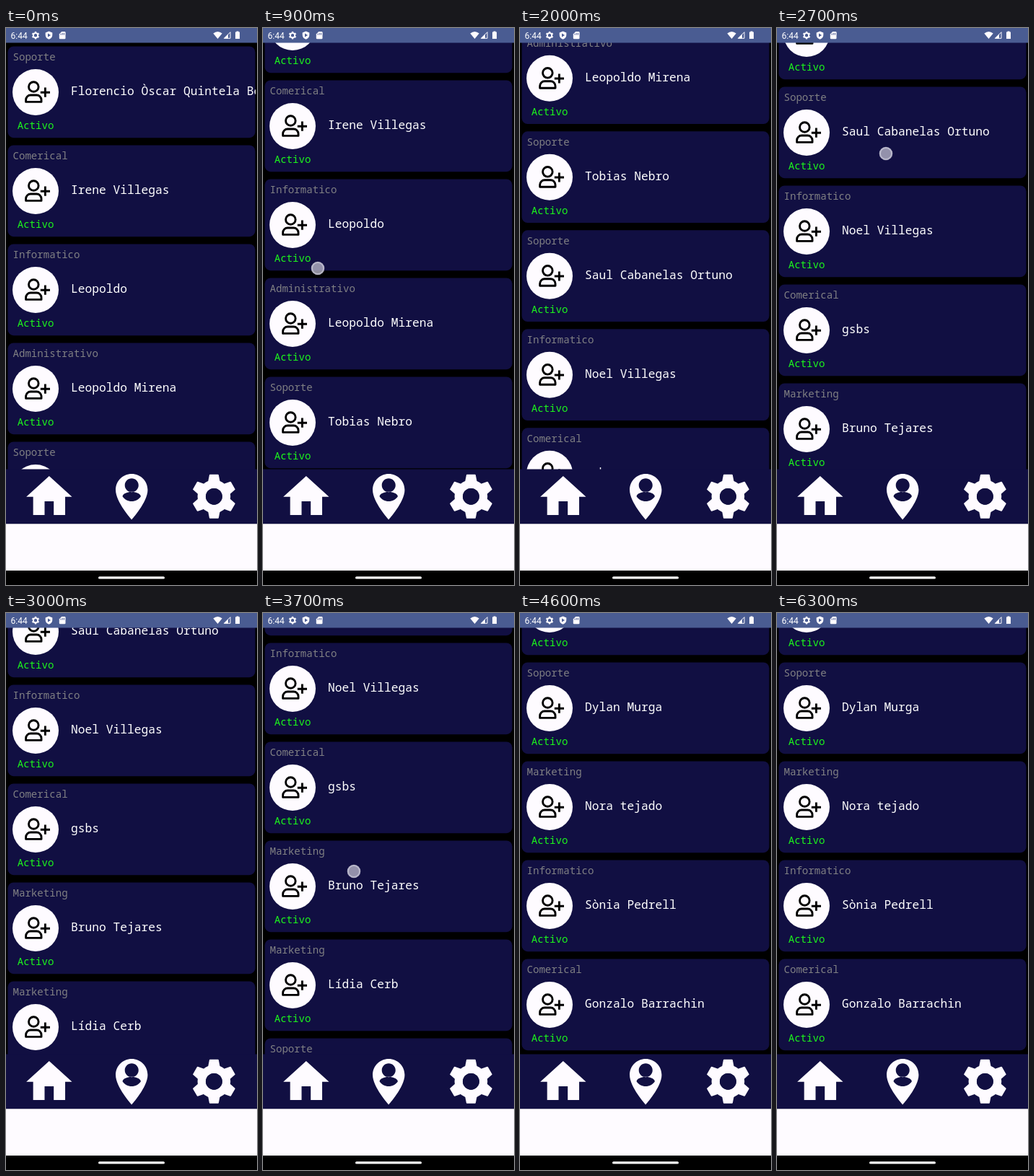
These frames come from a looping animation (348x772 px, 8100 ms). An HTML page:

```html
<!DOCTYPE html>
<html lang="es">
<head>
<meta charset="utf-8">
<title>Lista de contactos</title>
<style>
  html, body { margin: 0; width: 100%; height: 100%; overflow: hidden; background: #000; }
  svg { display: block; width: 348px; height: 772px; }
  .card text { font-family: "Noto Sans Mono", "DejaVu Sans Mono", monospace; font-weight: 300; white-space: pre; }
  .role { font-size: 14.1px; fill: #808083; }
  .name { font-size: 16.25px; fill: #fff; }
  .state { font-size: 14.1px; fill: #1cf51c; }
  .clock { font: 12px Roboto, sans-serif; fill: #fff; }
</style>
</head>
<body>
<svg viewBox="0 0 348 772">
  <defs>
    <clipPath id="viewport"><path d="M0 20H346V612H0z"/></clipPath>
    <path id="tooth" d="M-1.75-9.3H1.75L2.3-6.5 3-4H-3L-2.3-6.5z" stroke="#fefbff" stroke-width=".6" stroke-linejoin="round"/>
    <g id="gear">
      <g id="teeth"></g>
      <circle r="5.4" fill="none" stroke="#fefbff" stroke-width="3.6"/>
    </g>
    <mask id="hub">
      <path d="M-12-12H12V12H-12z" fill="#fff"/>
      <circle r="3.6" fill="#000"/>
    </mask>
    <g id="avatar">
      <circle cx="41" cy="89" r="32" fill="#fefbff"/>
      <g fill="none" stroke="#000" stroke-width="2.9" stroke-linejoin="round">
        <circle cx="38.3" cy="81.5" r="6.8"/>
        <path d="M27.6 102.4V99.5a6.5 6.5 0 0 1 6.5-6.5h8.4a6.5 6.5 0 0 1 6.5 6.5v2.9z"/>
        <path d="M47.8 89.2H61M54.4 82.6V95.8"/>
      </g>
    </g>
  </defs>

  <path d="M0 0H348V772H0z"/>
  <g clip-path="url(#viewport)"><g id="list"></g></g>
  <g id="touch">
    <circle r="9.3" fill="#b4b2c6" fill-opacity=".8"/>
    <circle r="8" fill="none" stroke="#d9d8e6" stroke-width="2" stroke-opacity=".55"/>
  </g>

  <path d="M0 0H348V20.4H0z" fill="#4a5c92"/>
  <text class="clock" x="6.5" y="14.5">6:44</text>
  <g fill="#fefbff">
    <use href="#gear" mask="url(#hub)" transform="translate(41 10.2) scale(.55)"/>
    <path d="M59.5 4.5L64.3 6.6V9.8C64.3 12.6 62.3 15 59.5 15.8 56.7 15 54.7 12.6 54.7 9.8V6.6z"/>
    <path d="M58 7.6L62 10.1 58 12.6z" fill="#4a5c92"/>
    <path d="M77.2 5H81.2Q82.5 5 82.5 6.2V14Q82.5 15.2 81.2 15.2H75Q73.8 15.2 73.8 14V8.4z"/>
    <path d="M76 7.8V9.6M78.2 6.8V9.6M80.4 6.8V9.6" stroke="#4a5c92"/>
    <path d="M287.3 7.6Q293.5 2.4 299.7 7.6L293.5 15z"/>
    <path d="M302.4 14.3L311 5.7V14.3z" fill="none" stroke="#fefbff"/>
    <path d="M302 14.6L308 8.6V14.6z"/>
    <path d="M319.5 4.5H322.5V5.6H324V15H318V5.6H319.5z"/>
  </g>

  <path d="M0 611.5H348V687.5H0z" fill="#110f42"/>
  <path d="M0 687.3H348V752H0z" fill="#fefbff"/>
  <path d="M0 752H348V772H0z"/>
  <rect x="128" y="760.2" width="92" height="3.4" rx="1.7" fill="#fff"/>
  <g fill="#fefbff">
    <path transform="translate(21.8 611.6) scale(3.17)" d="M10 20v-6h4v6h5v-8h3L12 3 2 12h3v8z"/>
    <path transform="translate(136.2 611.6) scale(3.17)" fill-rule="evenodd" d="M12 2C8.14 2 5 5.14 5 9c0 5.25 7 13 7 13s7-7.75 7-13c0-3.86-3.14-7-7-7zm0 2c1.66 0 3 1.34 3 3s-1.34 3-3 3-3-1.34-3-3 1.34-3 3-3zm0 10c-1.67 0-3.14-.85-4-2.15.02-1.32 2.67-2.05 4-2.05s3.98.73 4 2.05c-.86 1.3-2.33 2.15-4 2.15z"/>
    <use href="#gear" transform="translate(288.4 649.3) scale(3.17)"/>
  </g>
</svg>
<script>
const LOOP = 8100, STEP = 100, PITCH = 137;
const $ = id => document.getElementById(id);

const contacts = [
  ["Soporte", "Florencio Òscar Quintela Be"],
  ["Comerical", "Irene Villegas"],
  ["Informatico", "Leopoldo"],
  ["Administrativo", "Leopoldo Mirena"],
  ["Soporte", "Tobias Nebro"],
  ["Soporte", "Saul Cabanelas Ortuno"],
  ["Informatico", "Noel Villegas"],
  ["Comerical", "gsbs"],
  ["Marketing", "Bruno Tejares"],
  ["Marketing", "Lídia Cerb"],
  ["Soporte", "Dylan Murga"],
  ["Marketing", "Nora tejado"],
  ["Informatico", "Sònia Pedrell"],
  ["Comerical", "Gonzalo Barrachin"]
];

$("list").innerHTML = contacts.map(([role, name], i) => `
  <g class="card" transform="translate(0 ${i * PITCH})">
    <rect x="2.5" y="25.5" width="343" height="126.7" rx="8" fill="#110f42"/>
    <text class="role" x="9.5" y="45">${role}</text>
    <use href="#avatar"/>
    <text class="name" x="90" y="93.3">${name}</text>
    <text class="state" x="15.7" y="140">Activo</text>
  </g>`).join("");

$("teeth").innerHTML = Array.from({ length: 6 }, (_, i) =>
  `<use href="#tooth" transform="rotate(${i * 60})"/>`).join("");
$("gear").setAttribute("mask", "url(#hub)");

// Each swipe drags from `from` to `release`, then flings to `rest`; x, y is the finger at release.
const swipes = [
  { start: 600, up: 900, end: 1200, from: 0, release: 90, rest: 145, drag: 1.5, fling: 3, x: 76, y: 333 },
  { start: 1300, up: 1500, end: 2200, from: 145, release: 229.5, rest: 435, drag: 1.5, fling: 3, x: 116, y: 299 },
  { start: 2400, up: 2700, end: 3300, from: 435, release: 629, rest: 765, drag: 1.5, fling: 3, x: 151, y: 174 },
  { start: 3550, up: 3850, end: 4400, from: 765, release: 929, rest: 1327, drag: 2, fling: 2, x: 130, y: 235 }
];

const mix = (a, b, p) => a + (b - a) * p;

function scrollAt(s, t) {
  if (t <= s.up) return mix(s.from, s.release, ((t - s.start) / (s.up - s.start)) ** s.drag);
  const p = Math.min(1, (t - s.up) / (s.end - s.up));
  return mix(s.release, s.rest, 1 - (1 - p) ** s.fling);
}

function draw(now) {
  const t = Math.floor((now % LOOP) / STEP) * STEP;
  const swipe = swipes.findLast(s => t > s.start);
  const scroll = swipe ? scrollAt(swipe, t) : 0;
  $("list").setAttribute("transform", `translate(0 ${-scroll})`);

  const touching = swipe && t <= swipe.up;
  $("touch").setAttribute("visibility", touching ? "visible" : "hidden");
  if (touching) {
    const left = (swipe.up - t) / (swipe.up - swipe.start);
    $("touch").setAttribute("transform",
      `translate(${swipe.x - 8 * left} ${swipe.y + swipe.release - scroll})`);
  }
}

const origin = performance.now();
function tick() {
  draw(performance.now() - origin);
  requestAnimationFrame(tick);
}
tick();
</script>
</body>
</html>
```
